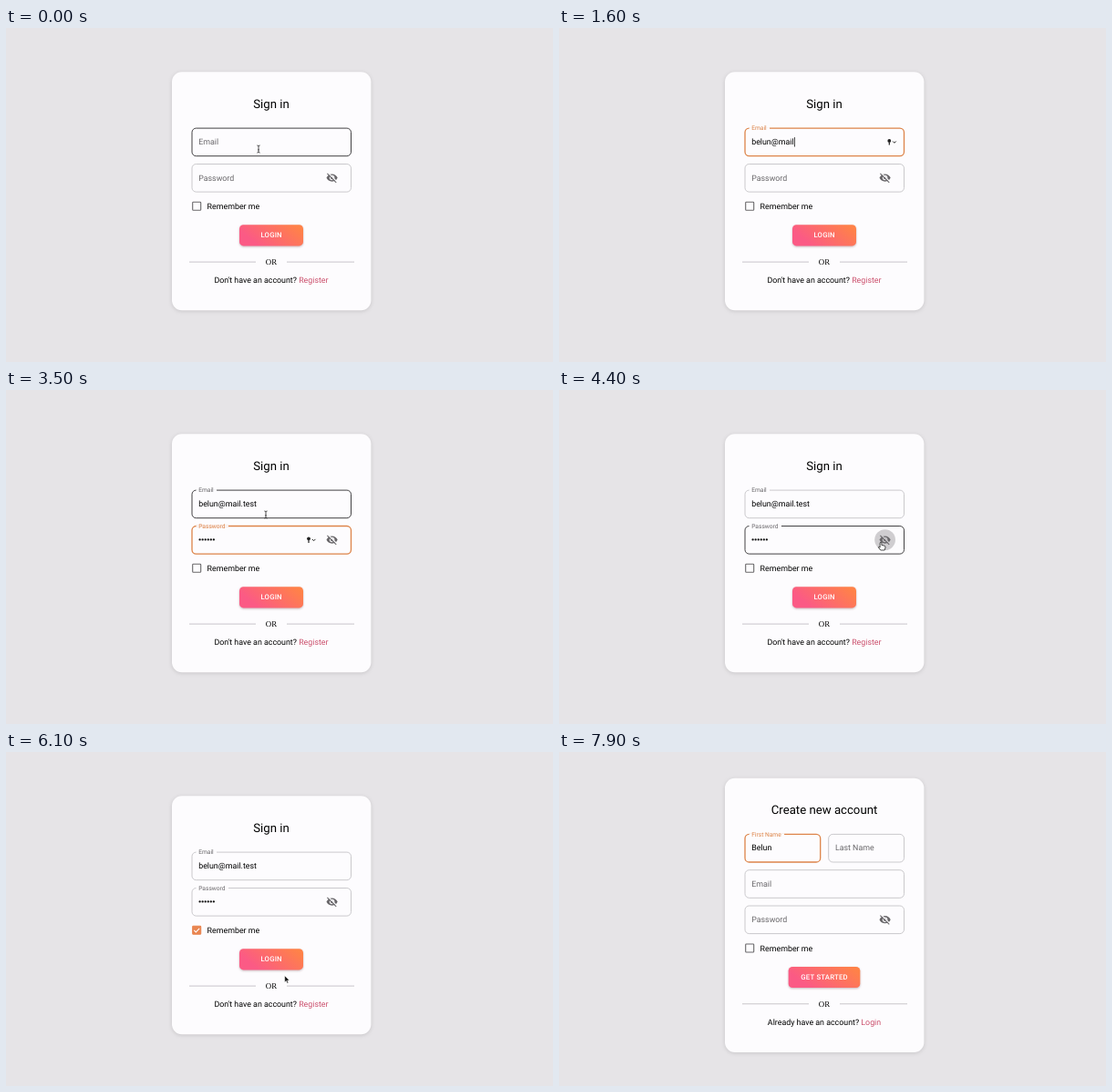
An HTML page that plays this animation: 600 by 367 pixels, repeating every 8 s.

```html
<!DOCTYPE html>
<html lang="en">
<head>
<meta charset="utf-8">
<style>
  html, body { margin: 0; width: 100%; height: 100%; overflow: hidden; background: #e6e4e7; }
  svg { display: block; width: 100%; height: 100%; font: 8.86px Roboto, sans-serif; text-rendering: geometricPrecision; }
  .card { filter: drop-shadow(0 1px 2px rgba(0, 0, 0, .13)); }
  .raised { filter: drop-shadow(0 1px 1px rgba(90, 40, 50, .32)); }
  .mid { text-anchor: middle; }
  .title { font-size: 13.2px; }
  .action { font-size: 7.75px; font-weight: 500; letter-spacing: .22px; }
  .or { font-family: "Liberation Serif", Times, serif; }
</style>
</head>
<body>
<svg id="stage" viewBox="0 0 600 367"></svg>
<script>
const LOOP = 8000, STEP = 100;
const CARD = '#fdfcfe', ORANGE = '#dd8449', GREY = '#69676a', LINE = '#c5c3c7';
const EMAIL = 'belun@mail.test', FIRST = 'Belun';
const stage = document.getElementById('stage');
const pen = document.createElement('canvas').getContext('2d');

// Pointer path: time, x, y, shape
const path = [
  [0, 277, 133, 'beam'], [700, 277, 133, ''],
  [3300, 283, 134, 'beam'], [3500, 285, 137, 'beam'],
  [3700, 310, 152, 'beam'], [4000, 340, 164, 'beam'],
  [4200, 353, 167, 'hand'], [4500, 353, 167, 'hand'],
  [4600, 338, 186, 'arrow'], [4700, 280, 194, 'arrow'],
  [4800, 236, 194, 'hand'], [5000, 236, 194, 'hand'],
  [5300, 290, 230, 'hand'], [5400, 290, 230, 'arrow'],
  [6000, 290, 230, 'arrow'], [6300, 337, 277, 'hand'],
  [6500, 337, 277, 'hand'], [6700, 312, 281, 'hand'],
  [6800, 290, 222, 'arrow'], [6900, 247, 110, 'beam'],
  [7300, 247, 110, '']
];
const shapes = {
  '': '',
  beam: '<path d="M-1.6-4Q0-4 0-3V3Q0 4-1.6 4M1.6-4Q0-4 0-3M1.6 4Q0 4 0 3M-.8.9H.8" fill="none" stroke="#222" stroke-width=".8"/>',
  arrow: '<path d="M0 0V7.4L1.7 5.9 2.8 8.5 4.1 7.9 3 5.4H5.3Z" fill="#111" stroke="#fff" stroke-width=".6"/>',
  hand: '<path d="M-.9.8Q0-.6.9.8V3.4L4.2 4.2Q5.2 4.6 5 6L4.2 9H-.2L-2.8 5.9Q-2.6 4.7-.9 6Z" fill="#fff" stroke="#222" stroke-width=".8"/>'
};

const clamp = v => Math.max(0, Math.min(1, v));
const mix = (a, b, k) => a + (b - a) * k;
const typed = (s, t, start) => s.slice(0, Math.max(0, (t - start) / STEP + 1));

function width(s, size) {
  pen.font = size + 'px Roboto, sans-serif';
  return pen.measureText(s).width;
}

function text(s, x, y, attrs = '') {
  return `<text x="${x}" y="${y}" ${attrs}>${s}</text>`;
}

function rect(x, y, w, h, attrs) {
  return `<rect x="${x}" y="${y}" width="${w}" height="${h}" ${attrs}/>`;
}

function pointer(t) {
  let i = path.length - 1;
  while (path[i][0] > t) i--;
  const a = path[i], b = path[i + 1];
  const k = a[3] && b ? (t - a[0]) / (b[0] - a[0]) : 0;
  return { x: mix(a[1], b ? b[1] : a[1], k), y: mix(a[2], b ? b[2] : a[2], k), shape: a[3] };
}

function keyIcon(x, y) {
  return `<g transform="translate(${x} ${y})"><circle cy="-1.4" r="1.9" fill="#222"/>
    <path d="M0 0V3.2" stroke="#222" stroke-width="1.2"/>
    <path d="M3.8-.8 5.6 1 7.4-.8" fill="none" stroke="#222"/></g>`;
}

function eyeIcon(x, y, lit) {
  const back = lit ? '#cfcdd0' : CARD;
  return (lit ? `<circle cx="${x}" cy="${y}" r="11.4" fill="${back}"/>` : '') +
    `<g transform="translate(${x} ${y}) scale(.553) translate(-12 -12)">
    <path d="M1 12C2.7 7.6 7 4.5 12 4.5S21.3 7.6 23 12C21.3 16.4 17 19.5 12 19.5S2.7 16.4 1 12Z" fill="${GREY}"/>
    <circle cx="12" cy="12" r="5" fill="${back}"/><circle cx="12" cy="12" r="3" fill="${GREY}"/>
    <path d="M4 2.2 21.8 20" stroke="${back}" stroke-width="2.2"/>
    <path d="M2.6 3.6 20.4 21.4" stroke="${GREY}" stroke-width="1.9"/></g>`;
}

// o: value, lift (label 0..1), focus, caret, secret, keyX
function field(label, x, y, w, cur, o = {}) {
  const { value = '', lift = 0, focus, caret, secret, keyX } = o;
  const hover = cur.x > x && cur.x < x + w && cur.y > y && cur.y < y + 30.6;
  const edge = focus ? ORANGE : hover ? '#2d2c2e' : LINE;
  const size = mix(8.86, 6.65, lift);
  let out = rect(x, y, w, 30.6, `rx="4.6" fill="none" stroke="${edge}" stroke-width="${focus ? 1.3 : .9}"`);
  if (lift) out += rect(x + 4.6, y - 1, (width(label, 6.65) + 6) * lift, 2, `fill="${CARD}"`);
  out += text(label, x + 7.2, y + mix(18, 2.1, lift), `fill="${focus ? ORANGE : GREY}" style="font-size:${size}px"`);
  if (secret) {
    for (let i = 0; i < value.length; i++)
      out += `<circle cx="${x + 8.6 + i * 3.05}" cy="${y + 14.9}" r="1.15" fill="#111"/>`;
  } else out += text(value, x + 7.2, y + 18);
  if (caret) {
    const end = x + 7.6 + (secret ? value.length * 3.05 : width(value, 8.86));
    out += rect(end, y + 10, .8, 10.4, 'fill="#111"');
  }
  return out + (focus && keyX ? keyIcon(keyX, y + 15.2) : '');
}

function checkbox(y, on) {
  return rect(204.7, y - 4.5, 9, 9, `rx=".8" fill="${on ? '#e98550' : 'none'}" stroke="${on ? '#e98550' : GREY}" stroke-width="1.1"`) +
    (on ? `<path d="M206.3 ${y}l2 2.1 3.9-4" fill="none" stroke="#fff" stroke-width="1.1"/>` : '') +
    text('Remember me', 220.6, y + 3);
}

// Everything below the fields; y is the checkbox centre
function footer(y, checked, label, w, busy, question, link) {
  return checkbox(y, checked) +
    rect(291 - w / 2, y + 20.4, w, 23.2, `rx="4.4" fill="url(#warm)" ${busy ? '' : 'class="raised"'}`) +
    text(label, 291.1, y + 34.5, `class="mid action" fill="${busy ? 'rgba(0,0,0,.3)' : '#fff'}"`) +
    `<path d="M201 ${y + 61.3}H274M308 ${y + 61.3}H382" stroke="#c2c0c4" stroke-width=".9"/>` +
    text('OR', 291, y + 64.3, 'class="mid or"') +
    text(`${question} <tspan fill="#cb4f6c">${link}</tspan>`, 291, y + 84.3, 'class="mid"');
}

function card(y, h) {
  return rect(182, y, 218.4, h, `rx="11" fill="${CARD}" class="card"`);
}

function signIn(t, cur, blink) {
  const busy = t >= 5400 && t < 6000, d = busy ? 1.1 : 0;
  const onMail = t >= 500 && t < 2300, onPass = t >= 2300 && t < 4200;
  let out = card(48.3 - d, 262 + 2 * d);
  if (busy) {
    const k = (t - 5380) / 1020;
    const left = Math.max(0, mix(-.35, 1, k)), right = Math.min(1, 1.9 * k);
    out += '<g clip-path="url(#round)">' + rect(182, 47.2, 218.4, 2.4, 'fill="#fbd1b3"') +
      rect(182 + 218.4 * left, 47.2, 218.4 * Math.max(0, right - left), 2.4, 'fill="#e5834d"') + '</g>';
  }
  return out + `<g transform="translate(0 ${d})">` +
    text('Sign in', 291, 88.1, 'class="mid title"') +
    field('Email', 204, 110.1, 174.5, cur, {
      value: typed(EMAIL, t, 700), lift: clamp((t - 500) / 200), focus: onMail,
      caret: onMail && (blink || t >= 700 && t <= 2100), keyX: 362.3
    }) +
    field('Password', 204, 149.5, 174.5, cur, {
      value: typed('******', t, 2500), lift: clamp((t - 2300) / 200), focus: onPass, secret: true,
      caret: onPass && (blink || t >= 2500 && t <= 3000), keyX: 332
    }) +
    eyeIcon(357.6, 164.6, t >= 4200 && t < 4600) +
    footer(195.8, t >= 5000, 'LOGIN', 70, busy, "Don't have an account?", 'Register') + '</g>';
}

function signUp(t, cur, blink) {
  const focus = t >= 7000;
  return card(28.7, 301.3) +
    text('Create new account', 291, 68.3, 'class="mid title"') +
    field('First Name', 204, 90.4, 82.7, cur, {
      value: typed(FIRST, t, 7300), lift: clamp((t - 7000) / 200), focus,
      caret: focus && (blink || t >= 7300 && t <= 7700)
    }) +
    field('Last Name', 295.7, 90.4, 82.8, cur) +
    field('Email', 204, 129.7, 174.5, cur) +
    field('Password', 204, 169, 174.5, cur) +
    eyeIcon(357.6, 184.2) +
    footer(215.5, false, 'GET STARTED', 78.6, false, 'Already have an account?', 'Login');
}

const defs = `<defs>
  <linearGradient id="warm" x1="0" y1=".7" x2="1" y2=".3"><stop offset=".15" stop-color="#fb5a85"/><stop offset="1" stop-color="#ff8248"/></linearGradient>
  <clipPath id="round"><rect x="182" y="47.2" width="218.4" height="264.2" rx="11"/></clipPath></defs>`;

function draw(t) {
  const cur = pointer(t), blink = Math.floor(t / 500) % 2 === 0;
  stage.innerHTML = defs + (t < 6400 ? signIn : signUp)(t, cur, blink) +
    `<g transform="translate(${cur.x} ${cur.y})">${shapes[cur.shape]}</g>`;
}

let shown = -1;
function tick(now) {
  const t = Math.floor(now % LOOP / STEP) * STEP;
  if (t !== shown) draw(shown = t);
  requestAnimationFrame(tick);
}
draw(0);
requestAnimationFrame(tick);
</script>
</body>
</html>
```
